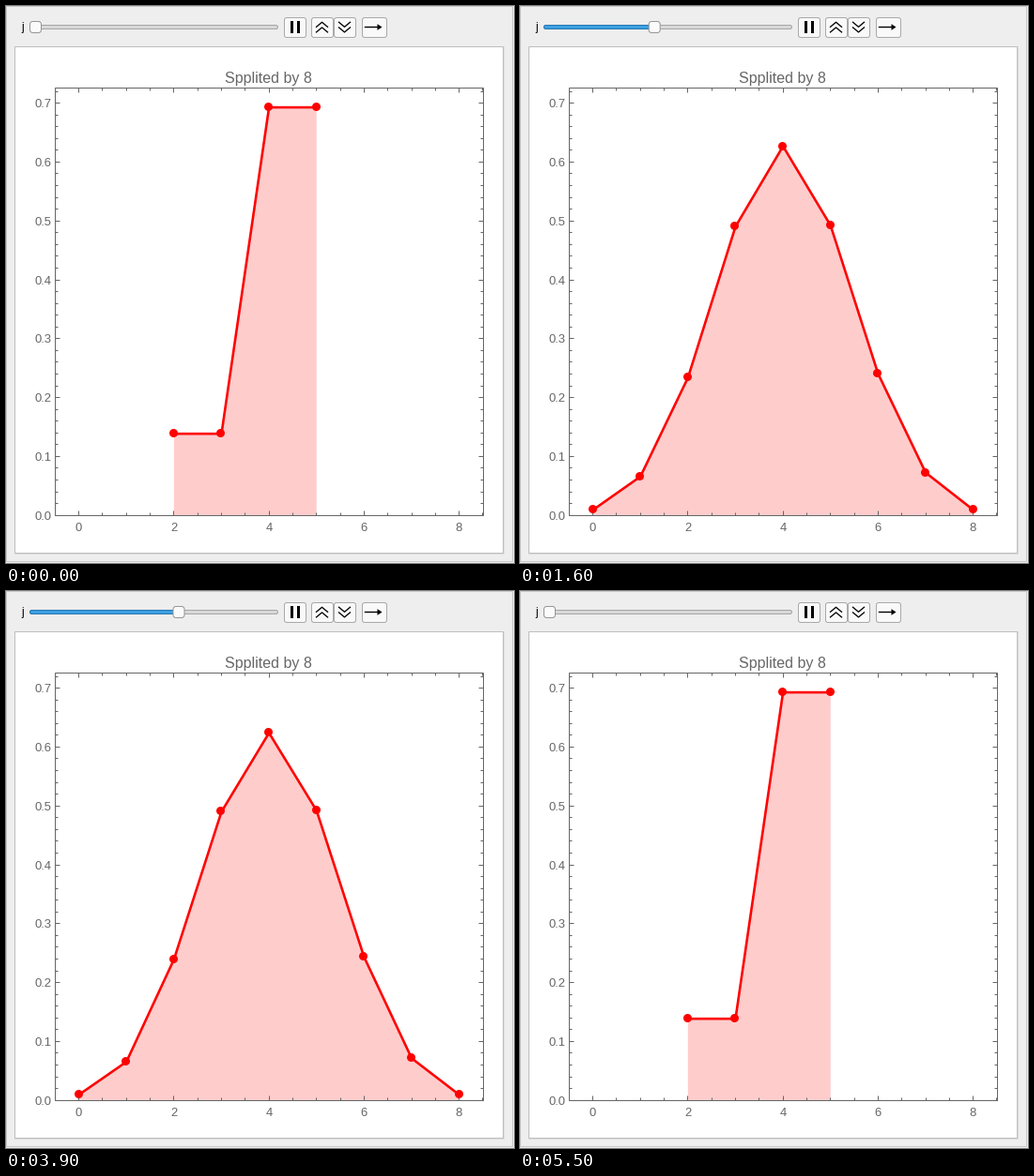
Recreate the animation shown at these times as a matplotlib script. Size 541x594 px, loop 6 s.

```python
import numpy as np
import matplotlib.pyplot as plt
from matplotlib.animation import FuncAnimation
from matplotlib.patches import Circle, FancyBboxPatch, Polygon, Rectangle

W, H, DPI = 541, 594, 64
PT = 72 / DPI  # points per pixel
FRAMES, INTERVAL = 60, 100
LAST = 25

GRAY = "#666666"
RED = "#ff0000"
LEFT, RIGHT, TOP, BOTTOM = 52.5, 508.5, 87.5, 543.5

# Unit-length histograms (in thousandths) reached at certain slider steps.
KNOTS = {
    0: [0, 0, 139, 139, 693, 693, 0, 0, 0],
    5: [7, 69, 198, 491, 644, 493, 222, 80, 9],
    16: [10, 66, 240, 491, 625, 493, 244, 72, 10],
    19: [10, 69, 235, 494, 623, 494, 241, 74, 10],
    24: [9, 69, 236, 499, 620, 491, 241, 72, 12],
}

# Lines are placed on pixel centres by hand.
plt.rcParams["path.snap"] = False

fig = plt.figure(figsize=(W / DPI, H / DPI), dpi=DPI, facecolor="#eeeeee")
ax = fig.add_axes([0, 0, 1, 1])
ax.set_xlim(0, W)
ax.set_ylim(H, 0)
ax.axis("off")


def px(v):
    return 77.6 + 50.63 * np.asarray(v)


def py(v):
    return 543.2 - 628 * np.asarray(v)


def center(v):
    """Centre of the pixel that holds v."""
    return np.floor(v) + 0.5


def line(xs, ys, color=GRAY, width=1, z=3, **kw):
    return ax.plot(xs, ys, color=color, lw=width * PT, zorder=z, **kw)[0]


def rect(x0, y0, x1, y1, face, edge="none", z=1):
    patch = Rectangle((x0, y0), x1 - x0, y1 - y0, fc=face, ec=edge,
                      lw=PT, zorder=z)
    return ax.add_patch(patch)


def rounded(x0, y0, x1, y1, face, edge, r=2.5, z=5):
    box = FancyBboxPatch((x0, y0), x1 - x0, y1 - y0, fc=face, ec=edge, lw=PT,
                         boxstyle=f"round,pad=0,rounding_size={r}", zorder=z)
    return ax.add_patch(box)


def label(x, y, s, size, color=GRAY, ha="center"):
    ax.text(x, y, s, fontsize=size * PT, color=color, ha=ha, va="baseline",
            family="Liberation Sans", zorder=4)


def tick(x, y, dx, dy):
    line([x, x + dx], [y, y + dy], solid_capstyle="butt")


def draw_panel():
    rect(0.5, 0.5, 539.5, 592.5, "none", "#c8c8c8")
    rect(9.5, 43.5, 530.5, 584.5, "none", "#dcdcdc")
    rect(9.5, 43.5, 529.5, 583.5, "white", "#bebebe")


def draw_axes():
    rect(LEFT, TOP, RIGHT, BOTTOM, "none", GRAY, z=3)
    for i in range(18):
        x = center(px(i / 2))
        size = 5 if i % 4 == 0 else 3
        tick(x, BOTTOM, 0, -size)
        tick(x, TOP, 0, size)
        if i % 4 == 0:
            label(x, 560, str(i // 2), 13)
    for i in range(37):
        y = center(py(i / 50))
        size = 5 if i % 5 == 0 else 3
        tick(LEFT, y, size, 0)
        tick(RIGHT, y, -size, 0)
        if i % 5 == 0:
            label(48.3, y + 4.5, f"{i / 50:.1f}", 13, ha="right")
    label(279.7, 82, "Spplited by 8", 16)


def draw_controls():
    label(18, 26, "j", 12, "black")
    rounded(25.5, 20.5, 289.5, 24.5, "#d8d8d8", "#a6a6a6", 2)
    for x0, x1 in [(296, 319), (325, 348), (349, 372), (379, 405)]:
        rounded(x0 + 0.5, 12.5, x1 + 0.5, 33.5, "#f9f9f9", "#a9a9a9")
    for x in (303, 310):
        rect(x, 16, x + 3, 29, "black", z=6)
    for x, d in ((336.5, -1), (360.5, 1)):
        for y in (19.8, 25.4):
            line([x - 6, x, x + 6], [y - 2.5 * d, y + 2.5 * d, y - 2.5 * d],
                 "black", 1.3, z=6)
    line([382.5, 397], [22.5, 22.5], "black", 1.4, z=6)
    ax.add_patch(Polygon([(395.5, 19.2), (400.5, 22.5), (395.5, 25.8)],
                         fc="black", zorder=6))


def weight(step):
    """Relative number of samples collected so far."""
    return np.where(np.asarray(step) == 0, 0.05, np.asarray(step) - 0.9)


def histogram(step):
    steps = np.array(list(KNOTS))
    totals = weight(steps)
    counts = np.array(list(KNOTS.values())) * totals[:, None]
    h = np.array([np.interp(weight(step), totals, c) for c in counts.T])
    return h / np.linalg.norm(h)


def slider_x(step):
    return max(31.5, 31 + 10.2 * (step - 1))


draw_panel()
draw_axes()
draw_controls()
area = ax.add_patch(Polygon([(0, 0)] * 3, fc="#ffcccc", ec="none", zorder=2))
curve = line([], [], RED, 2.6, z=4, solid_joinstyle="round",
             solid_capstyle="butt")
dots = [ax.add_patch(Circle((0, 0), 4.5, fc=RED, ec="none", zorder=5))
        for _ in range(9)]
done = rounded(25.5, 20.5, 31.5, 24.5, "#3d9fe2", "#2878b0", 2, z=6)
thumb = rounded(25.5, 16.5, 37.5, 28.5, "#fbfbfb", "#969696", 3, z=7)


def update(i):
    step = max(0, min(i - 4, LAST, 55 - i))
    h = histogram(step)
    seen = h > 0.005
    x, y = px(np.arange(9)), py(h)
    for dot, cx, cy, on in zip(dots, center(x - 0.6), center(y - 0.2), seen):
        dot.set_center((cx, cy))
        dot.set_visible(on)
    x, y = x[seen], y[seen] + 0.3
    curve.set_data(x, y)
    area.set_xy([(x[0], BOTTOM), *zip(x, y), (x[-1], BOTTOM)])
    pos = slider_x(step)
    done.set_visible(step > 1)
    done.set_width(pos - 25.5)
    thumb.set_x(pos - 6)
    return area, curve, done, thumb, *dots


anim = FuncAnimation(fig, update, frames=FRAMES, interval=INTERVAL,
                     repeat=True, repeat_delay=0, blit=False)
plt.show()
```
